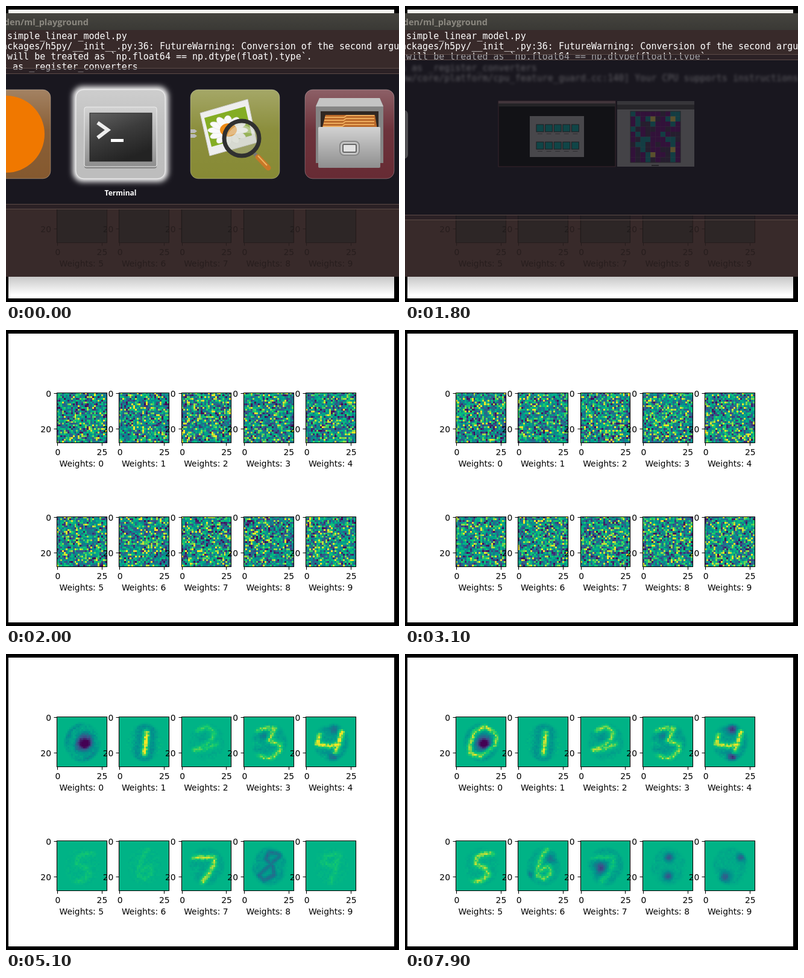
Animation, 652 px wide and 492 px high, one loop 8 s. Source, as an HTML page with a canvas:

```html
<!DOCTYPE html>
<html lang="en">
<head>
<meta charset="utf-8">
<title>Weights</title>
<style>
html, body { margin: 0; width: 100%; height: 100%; overflow: hidden; background: #000; }
#stage { position: relative; width: 652px; height: 492px; overflow: hidden; background: #000; }
canvas, svg { position: absolute; left: 0; top: 0; }
#axes text { font: 13.89px "DejaVu Sans", sans-serif; }
.mono { font: 15px "DejaVu Sans Mono", monospace; fill: #fff; }
.bold { font: bold 12px "Open Sans", "Noto Sans", sans-serif; fill: #fff; }
#desk, .icons, .picked, .windows, .windows.fading { visibility: hidden; }
[data-scene="terminal"] #desk, [data-scene="viewer"] #desk,
[data-scene="opening"] #desk, [data-scene="spread"] #desk,
[data-scene="terminal"] .icons, [data-scene="viewer"] .icons,
[data-scene="terminal"] .picked.t1, [data-scene="viewer"] .picked.t2,
[data-scene="opening"] .windows.fading, [data-scene="spread"] .windows.full { visibility: visible; }
</style>
</head>
<body>
<div id="stage">
<canvas id="plots" width="652" height="492"></canvas>
<svg width="652" height="492" viewBox="0 0 652 492">
  <defs>
    <filter id="glow" x="-30%" y="-30%" width="160%" height="160%"><feGaussianBlur stdDeviation="5"/></filter>
    <filter id="soft"><feGaussianBlur stdDeviation="2"/></filter>
    <linearGradient id="gloss" x2="0" y2="1">
      <stop offset="0" stop-color="#fff" stop-opacity=".25"/><stop offset=".45" stop-color="#fff" stop-opacity=".04"/>
      <stop offset="1" stop-color="#fff" stop-opacity="0"/>
    </linearGradient>
    <linearGradient id="bar" x2="0" y2="1"><stop stop-color="#45443f"/><stop offset="1" stop-color="#3a3935"/></linearGradient>
    <linearGradient id="floor" x2="0" y2="1"><stop stop-color="#c8c8c8"/><stop offset=".85" stop-color="#fff"/></linearGradient>
    <linearGradient id="steel" x2="0" y2="1"><stop stop-color="#d2d2d2"/><stop offset="1" stop-color="#8e8e8e"/></linearGradient>
    <linearGradient id="screen" x2=".5" y2="1"><stop stop-color="#616161"/><stop offset=".5" stop-color="#3c3c3c"/><stop offset="1" stop-color="#232323"/></linearGradient>
    <clipPath id="below"><rect y="338" width="652" height="112"/></clipPath>
  </defs>
  <g id="axes"></g>
  <g id="desk"></g>
</svg>
</div>
<script>
const stage = document.getElementById('stage');
const ctx = document.getElementById('plots').getContext('2d');
const SIDE = 28, CELL = 82.67 / SIDE, BASE = .65;
const left = i => 84 + 103.33 * (i % 5);
const top0 = i => 104.3 + (i < 5 ? 0 : 205.7);
const range = n => Array.from({ length: n }, (_, i) => i);
const clamp = (v, lo, hi) => Math.min(hi, Math.max(lo, v));

function seeded(seed) {
  return () => {
    seed = seed + 0x6D2B79F5 | 0;
    let h = Math.imul(seed ^ seed >>> 15, 1 | seed);
    h = h + Math.imul(h ^ h >>> 7, 61 | h) ^ h;
    return ((h ^ h >>> 14) >>> 0) / 4294967296;
  };
}

// Colour scale: [position, r, g, b]
const scale = [[0, 68, 1, 84], [.25, 59, 82, 139], [.5, 2, 143, 141],
  [.65, 0, 179, 134], [.76, 20, 201, 110], [.87, 145, 217, 70], [1, 253, 231, 37]];

function shade(v) {
  v = clamp(v, 0, 1);
  const k = Math.max(1, scale.findIndex(s => s[0] >= v));
  const a = scale[k - 1], b = scale[k], f = (v - a[0]) / (b[0] - a[0]);
  return `rgb(${[1, 2, 3].map(j => Math.round(a[j] + (b[j] - a[j]) * f))})`;
}

// Pen path and hollow spots of each digit on the 28 x 28 grid
const digits = [
  { path: '16,5 23,9 21.5,15.5 14,21.5 7,20.5 7.5,14 10.5,8 16,5', holes: '15.5,14.5,3.6' },
  { path: '15,8.5 13.7,20', holes: '' },
  { path: '9,7 14,5 18,8 17,12 12,16 7,18.5 13,17.5 19,15', holes: '12,11,3' },
  { path: '6,7 12,6 17,6 14,12.5 20,15 20,19 15.5,23 7,22', holes: '11,10,2.5' },
  { path: '7,10 6,15 13,16 18,15 20,8 18,15 16,20', holes: '14.5,6.5,2.6 15,22,2.5' },
  { path: '24,6 15,7 11,9 11,13 16,15 18,19 14,22 8,23', holes: '16,11,2.5' },
  { path: '17,3 13,8 11,14 10,19 14,21 18,18 17,14 12,16', holes: '18,10,3 6,19,2' },
  { path: '6,9 18,9 18,13 15,18 11,24', holes: '11,15,3.3' },
  { path: '20,7 14,6 12,10 16,14 17,19 11,22 8,19 14,14 20,8', holes: '14.5,9,2.4 14,19.5,2.5' },
  { path: '18,7 11,8 9,12 14,14 19,8 16,16 13,24', holes: '20,9,2.4 11,20,3' }
].map(d => ({ path: triples(d.path), holes: triples(d.holes) }));

function triples(s) { return s ? s.split(' ').map(p => p.split(',').map(Number)) : []; }

// Stroke, hollow and halo strength for each digit
const early = [[-.04, -.7, .2], [.36, 0, .14], [.12, -.04, .03], [.22, -.15, .08], [.36, -.22, .1],
  [.07, 0, 0], [.06, 0, 0], [.25, 0, .06], [-.27, -.05, .1], [.07, 0, 0]];
const middle = [[.24, -.7, .14], [.36, 0, .14], [-.08, -.08, .06], [.23, -.1, .08], [.14, -.42, .08],
  [.08, 0, .05], [.19, -.1, .06], [.31, 0, .06], [-.13, -.3, .06], [-.13, -.25, .06]];
const late = [[.26, -.7, .12], [.27, 0, .12], [.2, -.08, .06], [.22, -.15, .1], [.31, -.45, .1],
  [.23, 0, .03], [.17, -.2, .06], [.07, -.37, .08], [-.04, -.36, .05], [-.04, -.3, .06]];
const blend = (a, b, f) => a.map((row, i) => row.map((v, j) => v + (b[i][j] - v) * f));

function distance(path, x, y) {
  let best = 99;
  for (let k = 1; k < path.length; k++) {
    const [ax, ay] = path[k - 1], dx = path[k][0] - ax, dy = path[k][1] - ay;
    const f = clamp(((x - ax) * dx + (y - ay) * dy) / (dx * dx + dy * dy || 1), 0, 1);
    best = Math.min(best, Math.hypot(x - ax - f * dx, y - ay - f * dy));
  }
  return best;
}

function trained(amps) {
  return i => {
    const { path, holes } = digits[i], [stroke, hollow, halo] = amps[i];
    const rnd = seeded(40 + i);
    const grain = .02 + .12 * halo;
    return (x, y) => {
      const r = rnd(), d = distance(path, x, y);
      const mask = clamp((11.5 - Math.hypot((x - 14) * 1.08, y - 14)) / 2, 0, 1);
      let v = stroke * (.7 + .5 * r) * Math.exp(-((d / 1.4) ** 2));
      v -= halo * Math.exp(-(((d - 4) / 2.4) ** 2));
      for (const [hx, hy, hr] of holes)
        v += hollow * Math.exp(-(((x - hx) ** 2 + (y - hy) ** 2) / (hr * hr)));
      return BASE + mask * (v + (r - .5) * grain * 2);
    };
  };
}

function noise(seed) {
  return i => {
    const rnd = seeded(seed + i * 97);
    return () => .52 + (rnd() + rnd() - 1) * .62;
  };
}

function paint(model) {
  ctx.fillStyle = '#fff';
  ctx.fillRect(4, 6, 640, 480);
  for (let i = 0; i < 10; i++) {
    const value = model(i);
    const px = k => Math.round(left(i) + k * CELL), py = k => Math.round(top0(i) + k * CELL);
    for (let y = 0; y < SIDE; y++) for (let x = 0; x < SIDE; x++) {
      ctx.fillStyle = shade(value(x, y));
      ctx.fillRect(px(x), py(y), px(x + 1) - px(x), py(y + 1) - py(y));
    }
  }
}

const box = (x, y, w, h, fill, more = '') =>
  `<rect x="${x}" y="${y}" width="${w}" height="${h}" fill="${fill}" ${more}/>`;
const label = (x, y, text, anchor = 'middle') => `<text x="${x}" y="${y}" text-anchor="${anchor}">${text}</text>`;

document.getElementById('axes').innerHTML = range(10).map(i => {
  const x = Math.round(left(i)) + .5, y = Math.round(top0(i)) + .5;
  const bottom = Math.round(top0(i) + 82.67) + .5, right = Math.round(left(i) + 82.67) + .5;
  const ticks = [0, 25].map(n => `M${Math.floor(left(i) + (n + .5) * CELL) + .5} ${bottom}v5`)
    .concat([0, 20].map(n => `M${x} ${Math.floor(top0(i) + (n + .5) * CELL) + .5}h-5`)).join('');
  return `<path d="M${x} ${y}H${right}V${bottom}H${x}Z${ticks}" fill="none" stroke="#000" stroke-width="1.1"/>` +
    label(left(i) + 1.9, top0(i) + 103.7, 0) + label(left(i) + 75.4, top0(i) + 103.7, 25) +
    label(left(i) - 9, top0(i) + 6.7, 0, 'end') + label(left(i) - 9, top0(i) + 65.8, 20, 'end') +
    label(left(i) + 41.3, top0(i) + 122.8, 'Weights: ' + i);
}).join('');

const terminalIcon = box(14, 31, 120, 100, '#000', 'rx="4" opacity=".3"') +
  box(14, 29, 120, 99, 'url(#steel)', 'rx="3" stroke="#eee"') +
  box(23, 39, 103, 80, 'url(#screen)', 'stroke="#222"') +
  '<path d="M36 55L53 67L36 80" fill="none" stroke="#eee" stroke-width="6"/>' + box(58, 82, 21, 5, '#fff');

const viewerIcon = '<path d="M0 66h7l4 3-4 3H0zM0 74h7l4 3-4 3H0z" fill="#bbb"/>' +
  '<path d="M16 39L95 16L110 88L32 110Z" fill="#eee" stroke="#ccc"/>' +
  '<path d="M23 47L91 28L102 76L35 95Z" fill="#84ad24"/>' +
  range(12).map(k => `<ellipse cx="62" cy="46" rx="6" ry="12" fill="#fafafa" stroke="#ddd" stroke-width=".5"
    transform="translate(0 14) scale(1.15 .85) translate(-8 0) rotate(${k * 30} 62 63)"/>`).join('') +
  '<ellipse cx="63" cy="67" rx="14" ry="11" fill="#ef8b16"/>' +
  '<path d="M106 106L113 113" stroke="#777" stroke-width="6"/>' +
  '<path d="M112 112L129 130" stroke="#c87828" stroke-width="9" stroke-linecap="round"/>' +
  '<path d="M112 110L127 126" stroke="#efb560" stroke-width="2"/>' +
  '<circle cx="85" cy="81" r="29" fill="#b5b8a5" fill-opacity=".4" stroke="#303030" stroke-width="7"/>' +
  '<path d="M61 78A25 25 0 0 1 108 74Q84 68 61 78" fill="#fff" opacity=".3"/>';

const cabinetIcon = '<path d="M24 14H124L130 27V122H18V27Z" fill="#858585"/>' +
  '<path d="M24 14H124L130 28H18Z" fill="#c4c4c4"/>' + box(26, 36, 96, 30, '#302722') +
  '<path d="M34 42h82l4 24H28z" fill="#ba692a"/>' +
  range(4).map(k => `<path d="M${33 - k} ${46 + k * 5}h32l4-3h${46 + k}" fill="none" stroke="#edac5d" stroke-width="2"/>`).join('') +
  box(22, 62, 103, 68, 'url(#steel)', 'rx="2"') +
  box(58, 86, 32, 23, '#c5c5c5', 'rx="7" stroke="#888" stroke-width="2"') +
  box(63, 91, 22, 13, '#e2e2e2', 'rx="2" stroke="#666" stroke-width="2"');

const discIcon = '<circle cx="74" cy="74" r="64" fill="#f07800"/>';

function tile(k, color, icon, name) {
  const rect = (fill, more) => box(0, 0, 148, 148, fill, 'rx="13" ' + more);
  const lit = name ? `<g class="picked t${k}">` +
    box(-5, -5, 158, 158, '#fff', 'rx="16" filter="url(#glow)"') + rect('#bdbdbd', 'stroke="#e6e6e6"') +
    `<text class="bold" x="${k === 2 ? 75 : 74}" y="176" text-anchor="middle">${name}</text></g>` : '';
  return `<g transform="translate(${190 * k - 74} 139)">` + rect(color, '') + lit +
    rect('url(#gloss)', 'stroke="#fff" stroke-opacity=".28"') + icon + '</g>';
}

function panel(y, bottom) {
  const edge = v => box(0, v, 652, 1, '#5c4b47');
  return box(0, y, 652, bottom - y + 8, '#18161e', 'opacity=".4"') +
    box(0, y + 9, 652, bottom - y - 9, '#19171f') + [y, y + 9, bottom, bottom + 8].map(edge).join('');
}

const lines = [[2, 'simple_linear_model.py'],
  [-7, 'ackages/h5py/__init__.py:36: FutureWarning: Conversion of the second argument'],
  [2, 'will be treated as `np.float64 == np.dtype(float).type`.'],
  [-7, 's as _register_converters'],
  [-7, 'ow/core/platform/cpu_feature_guard.cc:140] Your CPU supports instructions that']];
const print = (from, to, y) => lines.slice(from, to)
  .map(([x, s], k) => `<text class="mono" x="${x}" y="${y + 17 * (k + from)}">${s}</text>`).join('');

function thumbnails() {
  const rnd = seeded(8);
  const small = range(10).map(i => {
    const x = 218 + 14.6 * (i % 5), y = i < 5 ? 197 : 226;
    return box(x, y, 12, 12, '#087470', 'stroke="#222"') + box(x + 2, y + 15, 8, 1, '#444');
  }).join('');
  const yellow = ['4,1', '8,1', '8,7', '4,8'];
  const cells = range(100).map(k => {
    const c = k % 10, r = k / 10 | 0, v = rnd();
    const teal = v < ([1, 3, 8].includes(c) ? .6 : .17);
    const fill = yellow.includes(c + ',' + r) ? '#9a8a3c' : teal ? '#0e6468' : v > .7 ? '#33263f' : '#4b0e55';
    return box(374 + c * 8.3, 175 + r * 8.5, 8.4, 8.6, fill);
  }).join('');
  return box(155, 158, 194, 109, '#0d0e0e', 'stroke="#56333a"') + box(155, 158, 194, 4, '#6a5358') +
    box(155, 162, 194, 5, '#302f2e') + box(207, 183, 90, 68, '#777') + small +
    box(352, 158, 128, 109, '#707070') + box(352, 158, 128, 6, '#565656') + box(352, 164, 128, 8, '#333') +
    cells + box(374, 175, 83, 85, 'none', 'stroke="#333"') + box(409, 264, 12, 2, '#333') +
    box(-20, 173, 25, 81, '#858585', 'rx="7"');
}

const spread = (cls, y, bottom, alpha) => `<g class="windows ${cls}">` + panel(y, bottom) +
  `<g filter="url(#soft)" opacity=".3">${print(Math.ceil((y - 41) / 17), 5, 57)}</g>` +
  `<g opacity="${alpha}">${thumbnails()}</g></g>`;

document.getElementById('desk').innerHTML = box(0, 0, 652, 492, '#000') +
  box(4, 6, 640, 6, '#f4f4f0') + box(4, 450, 640, 36, 'url(#floor)') +
  box(0, 12, 652, 28, 'url(#bar)') + box(0, 40, 652, 410, '#382a2a') +
  '<text class="bold" x="137" y="32" text-anchor="end" style="font-size:14.5px;fill:#8b8880">den/ml_playground</text>' +
  '<g clip-path="url(#below)">' + range(5).map(i => box(left(i), 310, 83, 83, '#2d2626')).join('') +
  '<use href="#axes" opacity=".3"/></g>' + print(0, 4, 55) +
  '<g class="icons">' + panel(103, 329) + tile(0, '#85592f', discIcon) + tile(1, '#858585', terminalIcon, 'Terminal') +
  tile(2, '#878a35', viewerIcon, 'Image Viewer') + tile(3, '#672b34', cabinetIcon) + '</g>' +
  spread('fading', 80, 347, .5) + spread('full', 53, 366, 1);

// [start in ms, scene, plot model]
const schedule = [[0, 'terminal'], [1200, 'viewer'], [1800, 'opening'], [1900, 'spread'],
  [2000, 'plots', noise(11)], [3100, 'plots', noise(2024)],
  [4100, 'plots', trained(blend(early, middle, -.25))], [5100, 'plots', trained(early)],
  [6000, 'plots', trained(blend(early, middle, .5))], [7000, 'plots', trained(middle)],
  [7900, 'plots', trained(late)]];
let shown = -1;

function tick() {
  const t = performance.now() % 8000;
  const step = schedule.filter(s => s[0] <= t).length - 1;
  if (step !== shown) {
    shown = step;
    const [, scene, model] = schedule[step];
    stage.dataset.scene = scene;
    if (model) paint(model);
  }
  requestAnimationFrame(tick);
}
tick();
</script>
</body>
</html>
```
